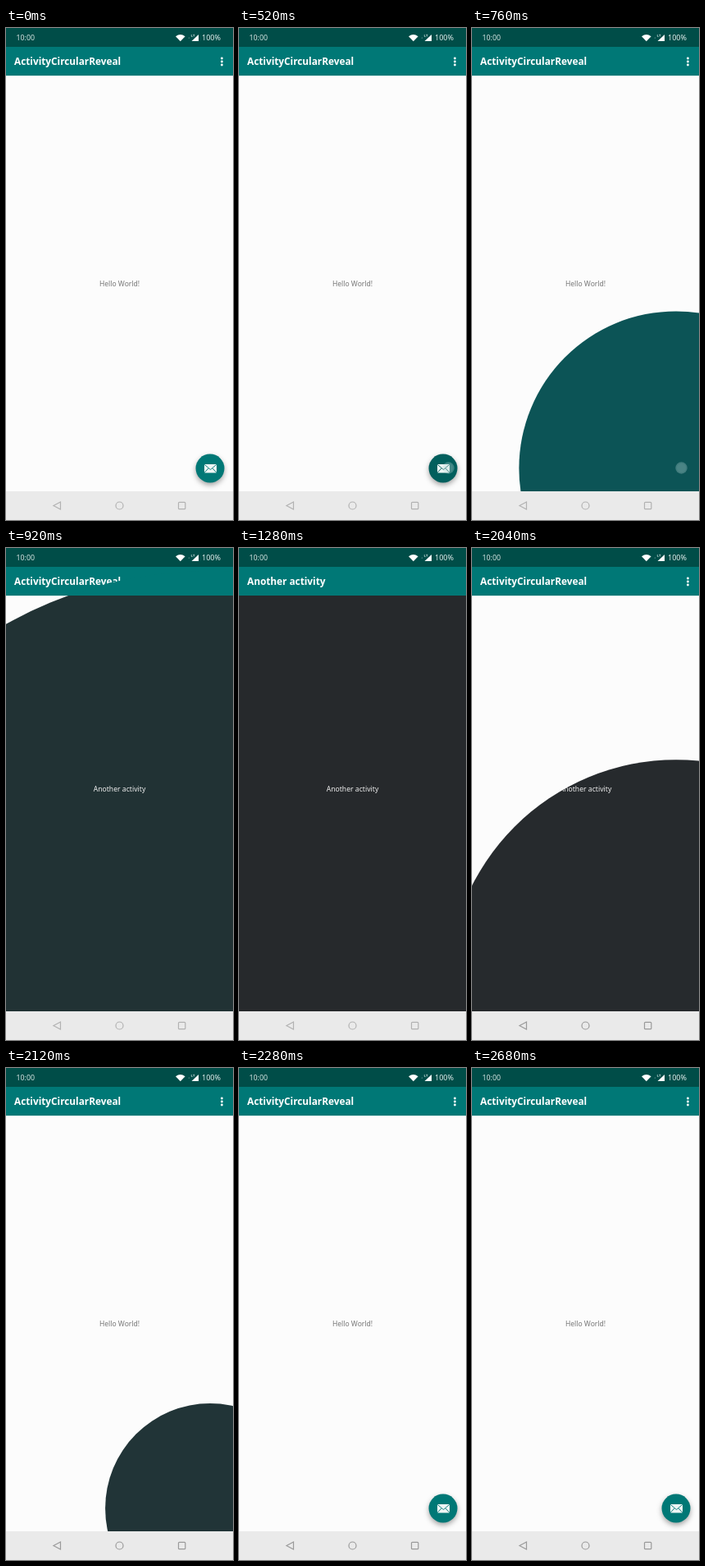
Write an HTML page with a canvas that moves like this. It is 277 px wide and 600 px high and loops after 2720 ms.

```html
<!DOCTYPE html>
<html lang="en">
<head>
<meta charset="utf-8">
<style>
html, body { margin: 0; width: 100%; height: 100%; overflow: hidden; background: #fcfcfc; }
canvas { display: block; }
</style>
</head>
<body>
<canvas width="277" height="600"></canvas>
<script>
const W = 277, H = 600, LOOP = 2720;
const STATUS_H = 23, BAR_H = 58, NAV_Y = 565;
const FAB = { x: 249, y: 537, r: 17.5 };
const MAX_RADIUS = Math.hypot(W, H);
const OPEN_AT = 580, CLOSE_AT = 1766, REVEAL_MS = 500;
const TEAL = [0, 120, 118], PRESSED = [2, 95, 93], DEEP_TEAL = [0, 104, 106], DARK = [38, 41, 44];
const ctx = document.querySelector('canvas').getContext('2d');

const clamp = v => Math.min(1, Math.max(0, v));
const progress = (t, start, length) => clamp((t - start) / length);
const ease = p => (1 - Math.cos(Math.PI * p)) / 2;
const mix = (a, b, p) => `rgb(${a.map((v, i) => Math.round(v + (b[i] - v) * p))})`;

function rect(x, y, w, h, color) {
  ctx.fillStyle = color;
  ctx.fillRect(x, y, w, h);
}

function disc(x, y, r, color) {
  ctx.fillStyle = color;
  ctx.beginPath();
  ctx.arc(x, y, r, 0, 2 * Math.PI);
  ctx.fill();
}

function text(str, x, y, size, color, align = 'left', weight = 400) {
  ctx.font = `${weight} ${size}px "Noto Sans", "Open Sans", sans-serif`;
  ctx.textAlign = align;
  ctx.fillStyle = color;
  ctx.fillText(str, x, y);
}

function path(d, color, lineWidth) {
  const shape = new Path2D(d);
  if (lineWidth) {
    ctx.strokeStyle = color;
    ctx.lineWidth = lineWidth;
    ctx.stroke(shape);
  } else {
    ctx.fillStyle = color;
    ctx.fill(shape);
  }
}

function appBar(title) {
  rect(0, STATUS_H, W, BAR_H - STATUS_H, mix(TEAL, TEAL, 0));
  text(title, 10, 45.3, 11.8, '#fff', 'left', 700);
}

function fab(pressed) {
  const color = mix(TEAL, PRESSED, pressed);
  ctx.save();
  ctx.shadowColor = 'rgba(0,0,0,.35)';
  ctx.shadowBlur = 6;
  ctx.shadowOffsetY = 3;
  disc(FAB.x, FAB.y, FAB.r, color);
  ctx.restore();
  path('M243 532H256Q257 532 257 533V541.5Q257 542.5 256 542.5H243Q242 542.5 242 541.5V533Q242 532 243 532Z', '#edf5f4');
  path('M242.3 532.5L249.5 538.5L256.7 532.5M242.3 542L247 537M256.7 542L252 537', color, 0.9);
}

function mainScreen(pressed) {
  rect(0, BAR_H, W, NAV_Y - BAR_H, '#fcfcfc');
  rect(0, BAR_H, W, 1, '#e4eaea');
  text('Hello World!', 138.5, 314.8, 8.55, '#777', 'center');
  fab(pressed);
  appBar('ActivityCircularReveal');
  for (const y of [37, 41, 45]) disc(263.4, y, 1.4, '#fff');
}

function secondScreen(radius, color) {
  ctx.save();
  ctx.beginPath();
  ctx.rect(0, STATUS_H, W, NAV_Y - STATUS_H);
  ctx.clip();
  ctx.beginPath();
  ctx.arc(FAB.x, FAB.y, radius, 0, 2 * Math.PI);
  ctx.clip();
  rect(0, BAR_H, W, NAV_Y - BAR_H, color);
  text('Another activity', 138.5, 297.4, 8.64, '#eee', 'center');
  appBar('Another activity');
  ctx.restore();
}

function statusBar() {
  rect(0, 0, W, STATUS_H, '#004d48');
  text('10:00', 12.5, 15.3, 8.8, '#d5e4e2');
  text('100%', 239, 15.3, 9, '#e4eeed');
  path('M207 10.2Q212.8 5.8 218.6 10.2L212.8 16.2Z', '#fff');
  path('M235 8V16H226.5Z', '#fff');
  path('M226.3 8V10.5H227.6M228.3 8.3H230.3M229.3 8.3V10.6', '#cfe0de', 0.7);
  disc(223.3, 12, 0.6, '#8fb5b1');
}

function navBar(color) {
  rect(0, NAV_Y, W, H - NAV_Y, '#eaeaea');
  path('M58 582.5L66.5 578V587Z', color, 1.2);
  path('M143 582.5A4.5 4.5 0 1 1 134 582.5A4.5 4.5 0 1 1 143 582.5Z', color, 1.2);
  path('M211.5 578.3H217.8Q218.8 578.3 218.8 579.3V585.7Q218.8 586.7 217.8 586.7H211.5Q210.5 586.7 210.5 585.7V579.3Q210.5 578.3 211.5 578.3Z', color, 1.2);
}

function draw(t) {
  const opened = ease(progress(t, OPEN_AT, REVEAL_MS));
  const closed = ease(progress(t, CLOSE_AT, REVEAL_MS));
  const pressed = t < CLOSE_AT ? progress(t, 440, 80) : 0;
  const touch = progress(t, 440, 60) * (1 - progress(t, 760, 80));

  mainScreen(pressed);
  if (opened > 0 && closed < 1) {
    const color = closed > 0
      ? mix(DARK, TEAL, closed ** 9)
      : mix(DEEP_TEAL, DARK, clamp(opened * 1.12));
    secondScreen(MAX_RADIUS * (opened - closed), color);
  }
  statusBar();
  navBar(t < 1840 ? '#b2b2b2' : '#9a9a9a');
  if (touch > 0) {
    disc(255.5, 536.5, 7.2, `rgba(190,220,220,${0.3 * touch})`);
    disc(255.5, 536.5, 5.5, `rgba(190,220,220,${0.08 * touch})`);
  }
}

function frame() {
  draw(performance.now() % LOOP);
  requestAnimationFrame(frame);
}
frame();
</script>
</body>
</html>
```
